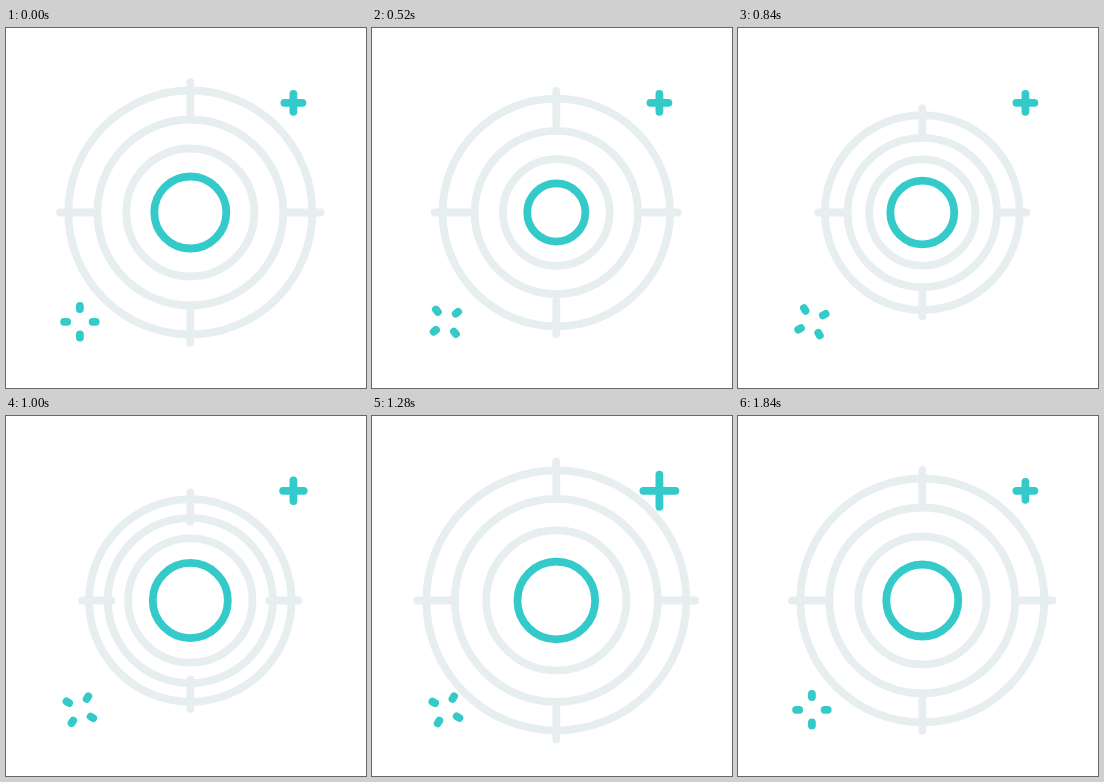
An HTML page that plays this animation: 360 by 360 pixels, repeating every 2 s.

```html
<!DOCTYPE html>
<html lang="en">
<head>
<meta charset="utf-8">
<title>Target pulse</title>
<style>
  html, body { margin: 0; width: 100%; height: 100%; overflow: hidden; background: #fff; }
  svg { display: block; width: 100%; height: 100%; }
  .pale, .teal { fill: none; stroke-width: 7.8; stroke-linecap: round; }
  .pale { stroke: #e6eeef; }
  .teal { stroke: #35caca; }
</style>
</head>
<body>
<svg viewBox="0 0 360 360">
  <g transform="translate(184.3 184.5)">
    <g id="rings"></g>
    <path id="ticks" class="pale"/>
  </g>
  <path id="plus" class="teal" transform="translate(287.4 74.8)"/>
  <path id="spinner" class="teal" d="M0-12.7V-15.8M12.7 0H15.8M0 12.7V15.8M-12.7 0H-15.8"/>
</svg>
<script>
const LOOP = 2000, STEP = 40, STAGGER = 80;
const $ = id => document.getElementById(id);

const clamp01 = x => Math.min(1, Math.max(0, x));
const soft = x => x * x * (3 - 2 * x);

// cubic-bezier(.5, 0, .5, 1), solved by bisection
function firm(x) {
  let lo = 0, hi = 1;
  for (let i = 0; i < 24; i++) {
    const u = (lo + hi) / 2;
    if (1.5 * u - 1.5 * u * u + u * u * u < x) lo = u; else hi = u;
  }
  return soft((lo + hi) / 2);
}

const tween = (t, start, end, from, to, ease) =>
  from + (to - from) * ease(clamp01((t - start) / (end - start)));

function pulse(t) {
  if (t < 620) return tween(t, 40, 620, 1, 0.798, firm);
  if (t < 1175) return tween(t, 620, 1175, 0.798, 1.096, firm);
  return tween(t, 1175, 1570, 1.096, 1, soft);
}

// From the centre outwards, each ring follows the one inside it.
const rings = [36, 64, 93, 122].map((radius, i) => {
  const node = document.createElementNS("http://www.w3.org/2000/svg", "circle");
  node.setAttribute("class", i ? "pale" : "teal");
  $("rings").append(node);
  return { node, radius, delay: i * STAGGER };
});

function crossPath(inner, outer) {
  return `M0 ${-inner}V${-outer}M${inner} 0H${outer}M0 ${inner}V${outer}M${-inner} 0H${-outer}`;
}

function draw(t) {
  for (const { node, radius, delay } of rings)
    node.setAttribute("r", radius * pulse(t - delay));

  const reach = pulse(t - 3 * STAGGER);
  $("ticks").setAttribute("d", crossPath(95 * reach, 130.3 * reach));

  const arm = t < 1320
    ? tween(t, 880, 1320, 9, 16.2, soft)
    : tween(t, 1320, 1840, 16.2, 9, soft);
  $("plus").setAttribute("d", crossPath(0, arm));

  const angle = tween(t, 0, 1835, 0, 360, firm);
  $("spinner").setAttribute("transform", `translate(73.9 293.8) rotate(${angle})`);
}

const origin = performance.now();
function frame() {
  const t = (performance.now() - origin) % LOOP;
  draw(Math.floor(t / STEP) * STEP);
  requestAnimationFrame(frame);
}
frame();
</script>
</body>
</html>
```
